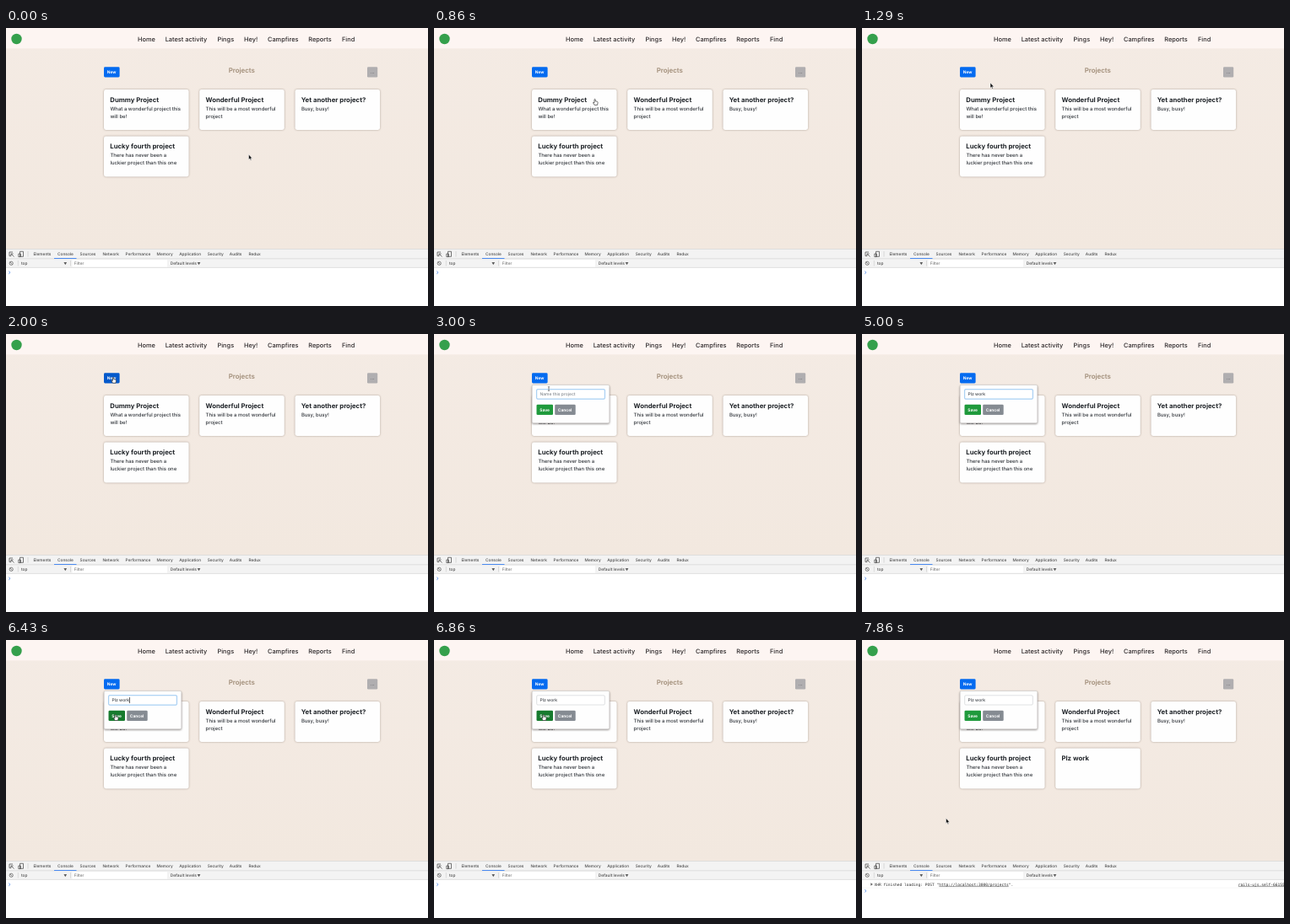
An HTML page that plays this animation: 500 by 330 pixels, repeating every 8 s.

```html
<!DOCTYPE html>
<html lang="en">
<head>
<meta charset="utf-8">
<title>Projects</title>
<style>
  html, body { margin: 0; width: 500px; height: 330px; overflow: hidden; background: #fff; }
  svg { display: block; }
  text { font-family: Inter, Roboto, sans-serif; text-rendering: geometricPrecision; white-space: pre; }
  .nav { font-size: 7.4px; font-weight: 500; fill: #2b2729; }
  .heading { font-size: 7.9px; font-weight: 600; fill: #a08d78; }
  .title { font-size: 7.75px; font-weight: 700; fill: #1f2328; }
  .body { font-size: 5.95px; font-weight: 500; fill: #30343a; }
  .btn { font-size: 4.9px; font-weight: 700; fill: #fff; }
  .field { font-size: 5px; font-weight: 500; }
  .tool { font-size: 4.8px; font-weight: 500; fill: #4a4a4a; }
  .arrow { font-size: 4px; fill: #555; }
  .log { font-family: "DejaVu Sans Mono", "Noto Sans Mono", monospace; font-size: 4.57px; fill: #2a2a2a; }
  .link { text-decoration: underline; }
  .card rect { fill: #fefefe; filter: drop-shadow(0 .7px .8px rgba(70, 50, 35, .42)); }
  .panel { fill: #fefefe; stroke: #c6c4c3; stroke-width: .5; filter: drop-shadow(0 1px 1.2px rgba(50, 40, 35, .5)); }
</style>
</head>
<body>
<svg id="stage" width="500" height="330" viewBox="0 0 500 330">
  <defs>
    <linearGradient id="sand" x1="0" y1="0" x2="0" y2="1">
      <stop offset="0" stop-color="#f4ebe4"/>
      <stop offset="1" stop-color="#f2e8df"/>
    </linearGradient>
  </defs>
</svg>
<script>
const LOOP = 8000, STEP = 1000 / 7;
const stage = document.getElementById('stage');

function add(tag, attrs, parent = stage) {
  const el = document.createElementNS('http://www.w3.org/2000/svg', tag);
  for (const key in attrs) el.setAttribute(key, attrs[key]);
  return parent.appendChild(el);
}
const group = (parent, cls = '') => add('g', { class: cls }, parent);
const rect = (x, y, width, height, fill, parent, rx = 0) =>
  add('rect', { x, y, width, height, fill, rx }, parent);
const path = (d, stroke, width, parent, fill = 'none') =>
  add('path', { d, stroke, 'stroke-width': width, fill }, parent);
function text(x, y, cls, str, parent) {
  const el = add('text', { x, y, class: cls }, parent);
  el.textContent = str;
  return el;
}
const show = (el, on) => el.setAttribute('visibility', on ? 'visible' : 'hidden');

// Page header
rect(0, 0, 500, 263, 'url(#sand)');
rect(0, 0, 500, 24.3, '#fdf5f2');
add('circle', { cx: 12.5, cy: 13, r: 6.2, fill: '#35a04c' });
[[156, 'Home'], [188.7, 'Latest activity'], [250.5, 'Pings'], [282, 'Hey!'],
 [310, 'Campfires'], [358.2, 'Reports'], [398, 'Find']]
  .forEach(([x, label]) => text(x, 15.7, 'nav', label));

text(263.7, 52.6, 'heading', 'Projects');
const newBtn = rect(116, 46.3, 18.6, 12.2, '#046bf0', stage, 1.4);
text(119.8, 54.2, 'btn', 'New');
rect(428, 46.3, 12.2, 12.2, '#b0aeb0', stage, 1.2);
text(431.8, 53.9, 'btn', '...').style.fill = '#55565a';

// Project cards
function card(x, y, title, lines = []) {
  const g = group(stage, 'card');
  rect(x, y, 100.6, 48, '#fefefe', g, 2.4);
  text(x + 7.3, y + 14.5, 'title', title, g);
  lines.forEach((line, i) => text(x + 7.4, y + 24.9 + i * 8.9, 'body', line, g));
  return g;
}
card(116, 73, 'Dummy Project', ['What a wonderful project this', 'will be!']);
card(229.2, 73, 'Wonderful Project', ['This will be a most wonderful', 'project']);
card(342.5, 73, 'Yet another project?', ['Busy, busy!']);
card(116, 128.4, 'Lucky fourth project', ['There has never been a', 'luckier project than this one']);
const newCard = card(229.2, 128.4, 'Plz work');

// New project form
const form = group(stage);
add('rect', { class: 'panel', x: 116.2, y: 60.5, width: 91.6, height: 45.2, rx: 1.6 }, form);
const glow = rect(120.9, 65, 82.2, 12.8, '#c9e2fb', form, 1.8);
const input = add('rect', { x: 121.7, y: 65.8, width: 80.6, height: 11.2, rx: 1.2, fill: '#fff', 'stroke-width': .6 }, form);
const value = text(125.5, 73.3, 'field', '', form);
const caret = rect(0, 68, .7, 7, '#222', form);
const saveBtn = rect(121.5, 83.8, 19.5, 12.2, '#1f9a3c', form, 1.3);
text(125.2, 91.6, 'btn', 'Save', form);
rect(143.2, 83.8, 24.5, 12.2, '#858b92', form, 1.3);
text(146.8, 91.6, 'btn', 'Cancel', form);

// Developer tools
rect(0, 262.3, 500, 68, '#fff');
rect(0, 262.3, 500, 22.2, '#f3f3f3');
[262.5, 273.8, 284.4].forEach(y => path(`M0 ${y}H500`, '#cfcfcf', .6));
path('M8 266H4v4.6h2M6 268l3.5 3.5M6 268v2.6M6 268h2.6', '#555', .8);
path('M16.5 265.3h4v6h-4zM14.8 268h2.6v3.6h-2.6z', '#555', .8, stage, '#f3f3f3');
path('M26 265v6.5M14.3 276v6.5M76.5 276v6.5', '#c8c8c8', .6);
[[32.4, 'Elements'], [61, 'Console'], [87.6, 'Sources'], [114.4, 'Network'], [141.6, 'Performance'],
 [178.6, 'Memory'], [205.2, 'Application'], [238.7, 'Security'], [264.8, 'Audits'], [287.4, 'Redux']]
  .forEach(([x, label]) => text(x, 270, 'tool', label));
rect(57, 273, 26.5, 1, '#4a8af0');
add('circle', { cx: 6.2, cy: 279.3, r: 2.1, fill: 'none', stroke: '#555', 'stroke-width': .7 });
path('M4.7 277.8l3 3', '#555', .7);
text(18, 281, 'tool', 'top');
text(68.3, 280.6, 'arrow', '▼');
rect(78.5, 275.2, 112.5, 8.3, '#fff');
text(80.8, 281, 'tool', 'Filter').style.fill = '#777';
text(194.8, 281, 'tool', 'Default levels');
text(226.6, 280.6, 'arrow', '▼');

const log = group(stage);
path('M10.3 288.2l2.6 1.8l-2.6 1.8z', 'none', 0, log, '#666');
const entry = text(14.4, 291.6, 'log', 'XHR finished loading: POST "', log);
const url = add('tspan', { class: 'link' }, entry);
url.textContent = 'http://localhost:3000/projects';
entry.append('".');
text(445.8, 291.6, 'log link', 'rails-ujs.self-66155', log);
path('M0 294.2H500', '#efefef', .5, log);
const prompt = path('M3.3 -1.6l1.7 1.6l-1.7 1.6', '#3f7fe8', .8);

// Pointers, drawn around their hot spot
const pointer = group(stage);
const shapes = {
  arrow: path('M0 0V6.2L1.4 5L2.3 7.2L3.3 6.8L2.4 4.7H4.3Z', '#fff', .5, pointer, '#111'),
  hand: path('M-.6 .6Q0 -.4 .6 .6V2.6L3 3.2Q3.6 3.5 3.5 4.4L3 7.2H-.5L-2.1 4.4Q-1.8 3.6 -.6 4.5Z', '#333', .7, pointer, '#fff'),
  beam: path('M-1.1 -2.5Q0 -2.5 0 -1.8Q0 -2.5 1.1 -2.5M0 -1.8V1.8M-1.1 2.5Q0 2.5 0 1.8Q0 2.5 1.1 2.5', '#555', .7, pointer)
};

// [tick, x, y]
const route = [[0, 287.5, 150], [1, 287.5, 150], [6, 190.6, 84.2], [9, 152, 65], [10, 150, 64],
  [13, 127, 51], [17, 127, 51], [20, 136, 65], [36, 136, 66], [43, 132, 88.5], [44, 132, 88.5],
  [45, 129.6, 88.3], [52, 129.6, 88.3], [53, 123, 116], [54, 110, 175], [55, 99.5, 211.5]];

function locate(k) {
  const i = route.findIndex(p => p[0] > k);
  if (i < 0) return route[route.length - 1].slice(1);
  const [a, x0, y0] = route[i - 1], [b, x1, y1] = route[i];
  const u = (k - a) / (b - a);
  return [x0 + (x1 - x0) * u, y0 + (y1 - y0) * u];
}

const inside = (x, y, l, t, r, b) => x >= l && x <= r && y >= t && y <= b;

function target(x, y, open) {
  if (inside(x, y, 116, 46, 135, 58.5)) return 'new';
  if (open && inside(x, y, 116, 60.5, 208, 106)) {
    if (inside(x, y, 121, 64, 203, 77)) return 'input';
    return inside(x, y, 121, 83, 141, 96) ? 'save' : '';
  }
  const onCard = inside(x, y, 116, 73, 216.6, 121) || inside(x, y, 116, 128.4, 216.6, 176.4);
  return onCard ? 'card' : '';
}

const PHRASE = 'Plz work';

function draw(time) {
  const k = Math.floor((time % LOOP + 3) / STEP);
  const open = k >= 17, focused = k < 47, saved = k >= 49;
  const [x, y] = locate(k);
  const over = target(x, y, open);

  const typed = PHRASE.slice(0, Math.max(0, k - 21));
  const typing = k >= 22 && k < 37;
  value.textContent = typed || 'Name this project';
  value.style.fill = typed ? '#3d4248' : '#858b91';
  input.setAttribute('stroke', focused ? '#7ab5ea' : '#c9cdd1');
  show(form, open);
  show(glow, open && focused);

  const lit = k >= 22 && (k < 33 || (k >= 37 && k < 41) || k >= 44);
  show(caret, open && focused && lit);
  caret.setAttribute('x', 125.8 + (typed ? value.getComputedTextLength() : 0));

  newBtn.setAttribute('fill', over === 'new' ? '#0459cb' : '#046bf0');
  saveBtn.setAttribute('fill', over === 'save' ? '#177b2e' : '#1f9a3c');
  show(newCard, saved);
  show(log, saved);
  prompt.setAttribute('transform', `translate(0 ${saved ? 297.8 : 290.3})`);

  const kind = over === 'input' ? 'beam' : over ? 'hand' : 'arrow';
  for (const name in shapes) show(shapes[name], !typing && name === kind);
  pointer.setAttribute('transform', `translate(${x} ${y})`);
}

const start = performance.now();
function tick() {
  draw(performance.now() - start);
  requestAnimationFrame(tick);
}
tick();
</script>
</body>
</html>
```
